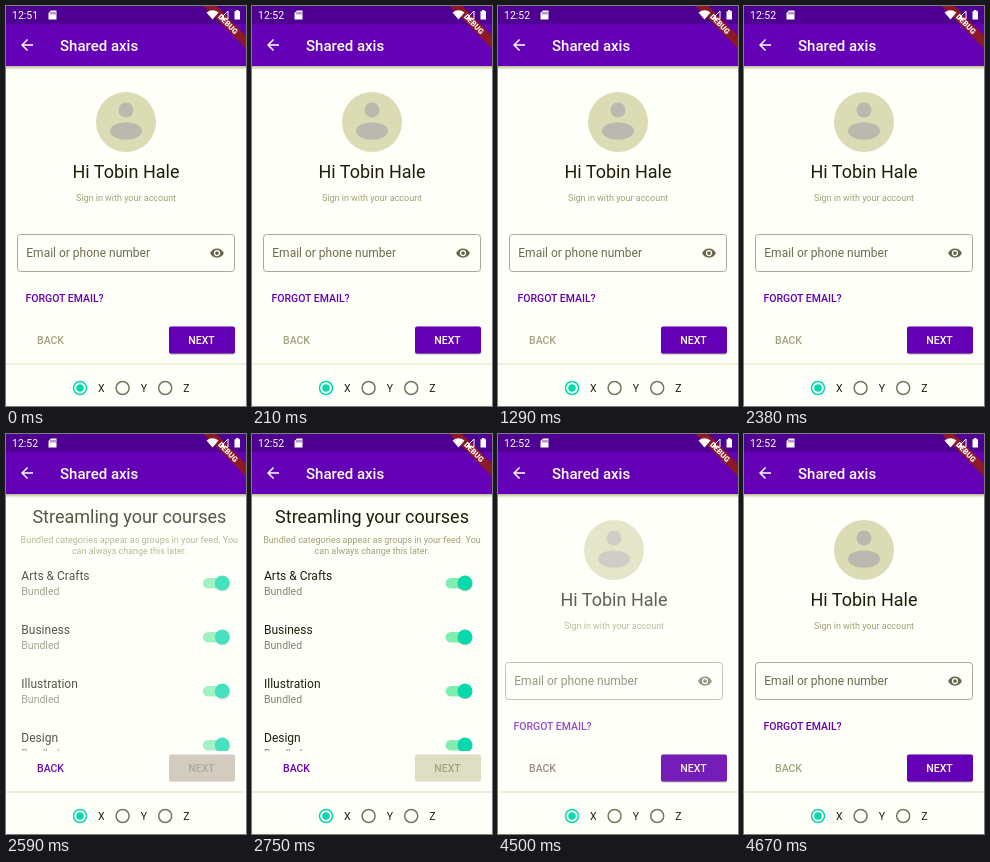
These frames come from a looping animation (240x400 px, 6290 ms). An HTML page:

```html
<!DOCTYPE html>
<html lang="en">
<head>
<meta charset="utf-8">
<title>Shared axis</title>
<style>
html, body { margin: 0; width: 100%; height: 100%; overflow: hidden; background: #fffffa; }
svg { display: block; width: 240px; height: 400px; font-family: Roboto, sans-serif; }
.title { font-size: 18px; fill: #1e1e08; text-anchor: middle; }
.caption { font-size: 9px; fill: #a0a074; text-anchor: middle; }
.label { font-size: 10.5px; }
.button { font-size: 10.5px; font-weight: 500; }
.purple { fill: #6400b6; }
</style>
</head>
<body>
<svg viewBox="0 0 240 400">
  <defs>
    <linearGradient id="shade" x2="0" y2="1">
      <stop stop-color="#707020" stop-opacity=".5"/>
      <stop offset="1" stop-color="#909040" stop-opacity="0"/>
    </linearGradient>
    <clipPath id="page"><rect y="60" width="240" height="257"/></clipPath>
  </defs>
  <rect width="240" height="400" fill="#fffffa"/>

  <g clip-path="url(#page)">
    <g id="signIn">
      <circle cx="120" cy="116" r="30" fill="#dbdbb4"/>
      <g fill="#b9b9b0">
        <circle cx="120" cy="104" r="7.5"/>
        <ellipse cx="120" cy="125" rx="16" ry="8.7"/>
      </g>
      <text class="title" x="120" y="172">Hi Tobin Hale</text>
      <text class="caption" x="120" y="195">Sign in with your account</text>
      <rect x="11.5" y="228.5" width="217" height="37" rx="3" fill="none" stroke="#aaaa9c"/>
      <text x="20.3" y="251" font-size="12" fill="#6c6c4c">Email or phone number</text>
      <path transform="translate(203.5 239.6) scale(.625)" fill="#68684c" fill-rule="evenodd"
        d="M12 4.5C7 4.5 2.7 7.6 1 12c1.7 4.4 6 7.5 11 7.5s9.3-3.1 11-7.5c-1.7-4.4-6-7.5-11-7.5zM12 17a5 5 0 1 1 0-10 5 5 0 0 1 0 10zM12 9a3 3 0 1 0 0 6 3 3 0 0 0 0-6z"/>
      <text class="button purple" x="19.5" y="296">FORGOT EMAIL?</text>
    </g>
    <g id="courses">
      <text class="title" x="120" y="89">Streamling your courses</text>
      <text class="caption" x="120" y="108.5">Bundled categories appear as groups in your feed. You</text>
      <text class="caption" x="120" y="119.5">can always change this later.</text>
      <g id="list"></g>
    </g>
  </g>

  <g class="button">
    <text id="back" x="31" y="338">BACK</text>
    <rect x="163" y="320.5" width="66" height="27" rx="2" fill="#dedec2"/>
    <text x="195.5" y="338" text-anchor="middle" fill="#a3a38c">NEXT</text>
    <g id="next">
      <rect x="163" y="321.5" width="66" height="27" rx="2" fill="#303010" opacity=".35"/>
      <rect class="purple" x="163" y="320.5" width="66" height="27" rx="2"/>
      <text x="195.5" y="338" text-anchor="middle" fill="#fff">NEXT</text>
    </g>
  </g>

  <rect y="357.5" width="240" height="1" fill="#e2e2bc"/>
  <g id="radios"></g>

  <rect y="60" width="240" height="4" fill="url(#shade)"/>
  <rect class="purple" width="240" height="60"/>
  <rect width="240" height="18" fill="#4d0091"/>
  <g fill="#fff">
    <path transform="translate(12 30) scale(.75)" d="M20 11H7.83l5.59-5.59L12 4l-8 8 8 8 1.41-1.41L7.83 13H20z"/>
    <text x="54" y="45" font-size="15" font-weight="500">Shared axis</text>
  </g>
  <g transform="translate(240 0) rotate(45)">
    <rect x="-30" y="21" width="60" height="9" fill="#8c1a26"/>
    <text y="28.2" font-size="7.65" font-weight="900" text-anchor="middle" fill="#fff">DEBUG</text>
  </g>
  <g fill="#fff">
    <text id="clock" class="label" x="6" y="13"></text>
    <path d="M45 4.5h5.5v9h-8V7z"/>
    <path d="M45 6v2.500M47 6v2.500M49 6v2.500" stroke="#4d0091" stroke-width=".8"/>
    <path d="M206.500 13.500L200.500 6.500q6-4.500 12 0z"/>
    <path d="M222 5v8h-8z" fill="none" stroke="#fff"/>
    <path d="M218 9v4h-4z"/>
    <path d="M228.500 5.300h1.500v-1.300h2.500v1.300h1.500v8.200h-5.500z"/>
  </g>
</svg>
<script>
const LOOP = 6290, DURATION = 320, FORWARD = 2408, REVERSE = 4328;
const $ = id => document.getElementById(id);
const clamp = v => Math.min(1, Math.max(0, v));

$('list').innerHTML = ['Arts &amp; Crafts', 'Business', 'Illustration', 'Design'].map((name, i) => `
  <g transform="translate(0 ${54 * i})">
    <text x="12" y="146" font-size="12" fill="#1e1e08">${name}</text>
    <text class="label" x="12" y="161" fill="#85856c">Bundled</text>
    <rect x="193.5" y="144" width="25" height="10.5" rx="5.25" fill="#82edb0"/>
    <circle cx="213" cy="150" r="7.5" fill="#303010" opacity=".2"/>
    <circle cx="213" cy="149" r="7.5" fill="#08d9ac"/>
  </g>`).join('');

$('radios').innerHTML = ['X', 'Y', 'Z'].map((axis, i) => {
  const x = 74 + 42.6 * i, color = i ? '#77775f' : '#08d9ac';
  return `<circle cx="${x}" cy="382" r="6.5" fill="none" stroke="${color}" stroke-width="1.5"/>
    ${i ? '' : `<circle cx="${x}" cy="382" r="3.75" fill="${color}"/>`}
    <text class="label" x="${x + 21.2}" y="386" text-anchor="middle" fill="#1e1e08">${axis}</text>`;
}).join('');

// Cubic Bézier easing, solved by bisection
function bezier(x1, y1, x2, y2) {
  const at = (a, b, s) => 3 * a * s * (1 - s) ** 2 + 3 * b * s * s * (1 - s) + s ** 3;
  return x => {
    if (x <= 0 || x >= 1) return clamp(x);
    let lo = 0, hi = 1;
    for (let i = 0; i < 20; i++) {
      const mid = (lo + hi) / 2;
      if (at(x1, x2, mid) < x) lo = mid; else hi = mid;
    }
    return at(y1, y2, lo);
  };
}
const standard = bezier(.4, 0, .2, 1);
const accelerate = bezier(.4, 0, 1, 1);
const decelerate = bezier(0, 0, .2, 1);

function place(page, x, opacity) {
  page.setAttribute('transform', `translate(${x} 0)`);
  page.setAttribute('opacity', opacity);
}

// Leaving page fades out in the first 30 %, the entering one fades in after it
function sharedAxis(leaving, entering, p, dir) {
  const slide = 22.5 * dir, move = standard(p);
  place(leaving, -slide * move, 1 - accelerate(clamp(p / .3)));
  place(entering, slide * (1 - move), decelerate(clamp((p - .3) / .7)));
}

function draw(t) {
  const returning = t >= REVERSE;
  const elapsed = t - (returning ? REVERSE : FORWARD);
  const p = clamp(elapsed / DURATION);
  if (returning) sharedAxis($('courses'), $('signIn'), p, -1);
  else sharedAxis($('signIn'), $('courses'), p, 1);

  const fade = clamp(elapsed / 200), active = returning ? 1 - fade : fade;
  $('next').setAttribute('opacity', 1 - active);
  const mix = (a, b) => Math.round(a + (b - a) * active);
  $('back').setAttribute('fill', `rgb(${mix(163, 100)},${mix(163, 0)},${mix(128, 182)})`);
  $('clock').textContent = t < 40 ? '12:51' : '12:52';
}

const start = performance.now();
function frame() {
  draw((performance.now() - start) % LOOP);
  requestAnimationFrame(frame);
}
frame();
</script>
</body>
</html>
```
